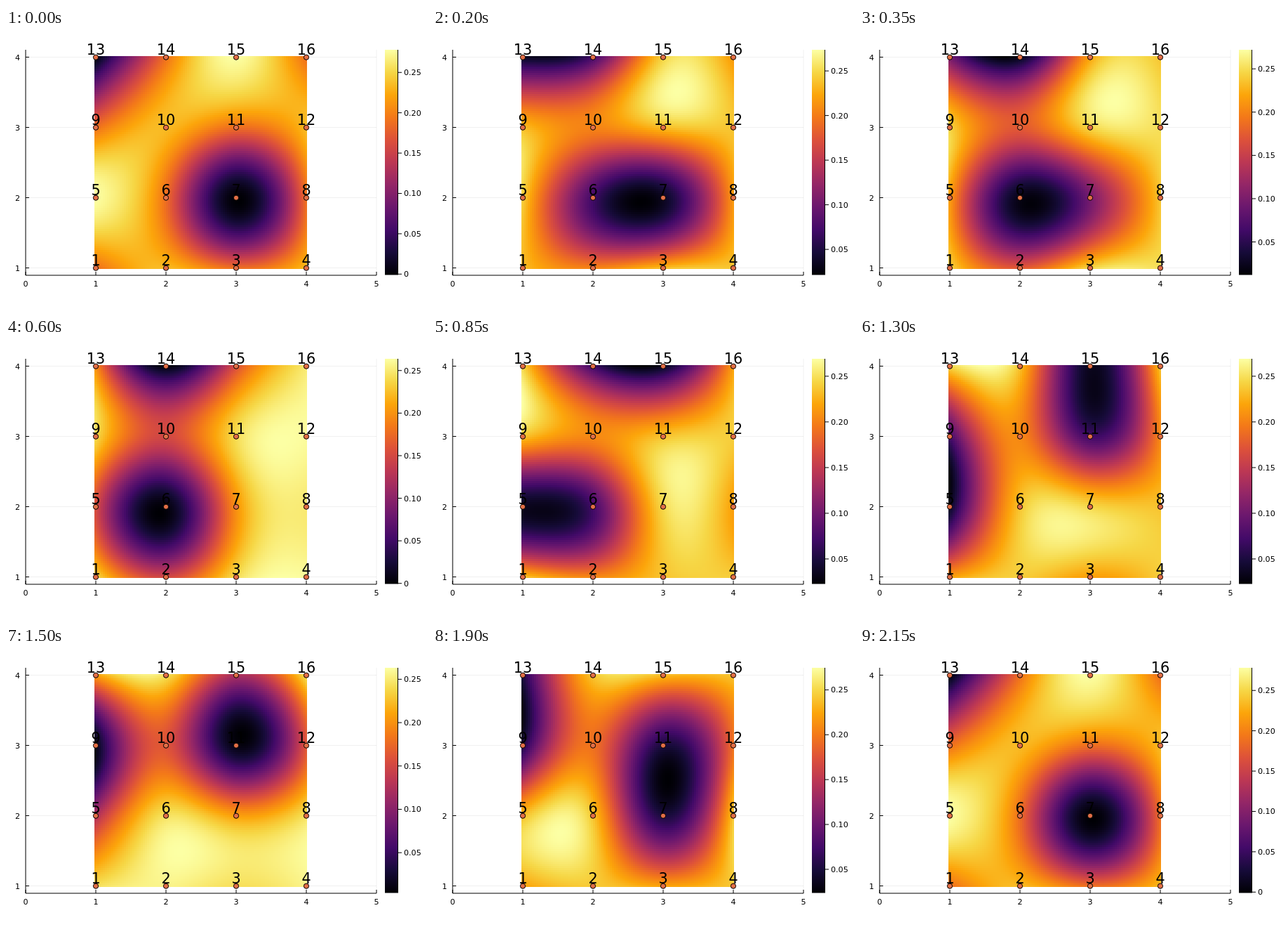
An HTML page with a canvas for the animation above (2.2 s loop, 600 by 400 pixels).

```html
<!DOCTYPE html>
<html lang="en">
<head>
<meta charset="utf-8">
<title>Two moving density holes on a 4 by 4 lattice</title>
<style>
html, body { margin: 0; width: 100%; height: 100%; overflow: hidden; background: #fff; }
canvas { display: block; }
</style>
</head>
<body>
<canvas id="stage" width="600" height="400"></canvas>
<script>
const ctx = document.getElementById('stage').getContext('2d');
const FONT = '"DejaVu Sans", Verdana, sans-serif';
const CELLS = 101, STEP_MS = 50, STEPS = 11;
const BAR = { x: 540, y: 31, w: 18, h: 320.5 };

// One hole visits these sites; the other is its point reflection.
const PATH = [[3, 2], [2, 2], [1, 2], [1, 3], [1, 4]];

// Site density by four times the squared periodic distances to both holes.
const DENSITY = {
  '4,4': .135, '4,20': .188, '8,8': .234, '16,16': .278, '16,32': .256, '20,20': .268,
  '1,17': .01, '1,25': .01, '5,5': .205, '5,13': .27, '13,13': .235, '9,25': .225, '9,17': .24
};

const INFERNO = ['000004', '160b39', '420a68', '6a176e', '932667', 'bc3754',
  'dd513a', 'f37819', 'fca50a', 'f6d746', 'fcffa4'];
const STOPS = INFERNO.map(c => [0, 2, 4].map(i => parseInt(c.substr(i, 2), 16)));

const heat = document.createElement('canvas');
heat.width = heat.height = CELLS;
const heatCtx = heat.getContext('2d');
const pixels = heatCtx.createImageData(CELLS, CELLS);

const px = x => 28 + 100 * x;
const py = y => 442 - 100 * y;
const mix = (a, b, t) => a + (b - a) * t;

function gap(a, b) {
  const d = Math.abs(a - b) % 4;
  return Math.min(d, 4 - d);
}

// Densities of the 16 sites, row by row, for one position of the holes.
function sites([hx, hy]) {
  const holes = [[hx, hy], [4 - hx, 6 - hy]];
  return Array.from({ length: 16 }, (_, i) => {
    const x = i % 4 + 1, y = Math.floor(i / 4) + 1;
    const key = holes.map(h => 4 * (gap(x, h[0]) ** 2 + gap(y, h[1]) ** 2))
      .sort((a, b) => a - b).join();
    return DENSITY[key] || 0;
  });
}

const LEGS = PATH.slice(1).map((to, i) => {
  const from = PATH[i];
  return [from, from.map((v, k) => (v + to[k]) / 2), to].map(sites);
});

// Natural cubic spline through four evenly spaced values.
function spline(p, x) {
  const i = Math.min(2, Math.floor(x)), u = x - i;
  const k1 = 6 * (p[0] - 2 * p[1] + p[2]), k2 = 6 * (p[1] - 2 * p[2] + p[3]);
  const m = [0, (4 * k1 - k2) / 15, (4 * k2 - k1) / 15, 0];
  return mix(p[i], p[i + 1], u) - u * (1 - u) / 6 * ((2 - u) * m[i] + (1 + u) * m[i + 1]);
}

function field(step) {
  const [a, mid, b] = LEGS[Math.floor(step / STEPS)];
  const s = step % STEPS / (STEPS - 1), r = 1 - s;
  const v = a.map((n, i) => r * r * n + 2 * r * s * mid[i] + s * s * b[i]);
  const rows = [0, 4, 8, 12].map(i => v.slice(i, i + 4));
  const out = [];
  for (let j = 0; j < CELLS; j++) {
    const column = rows.map(row => spline(row, j * .03));
    for (let i = 0; i < CELLS; i++) out[(CELLS - 1 - i) * CELLS + j] = spline(column, i * .03);
  }
  return out;
}

function line(x1, y1, x2, y2, color = '#000') {
  ctx.strokeStyle = color;
  ctx.lineWidth = 1;
  ctx.beginPath();
  ctx.moveTo(x1, y1);
  ctx.lineTo(x2, y2);
  ctx.stroke();
}

function text(str, x, y, align, size = 11.1) {
  ctx.font = `${size}px ${FONT}`;
  ctx.textAlign = align;
  ctx.fillStyle = '#000';
  ctx.fillText(str, x, y);
}

function drawAxes() {
  const faint = 'rgba(0,0,0,.06)';
  for (let x = 0; x <= 5; x++) {
    line(px(x), 31, px(x), 352, faint);
    line(px(x), 352, px(x), 347);
    text(x, px(x), 368, 'center');
  }
  for (let y = 1; y <= 4; y++) {
    line(28, py(y) - .5, 528, py(y) - .5, faint);
    line(28, py(y) - .5, 33, py(y) - .5);
    text(y, 20, py(y) + 4, 'right');
  }
  line(28, 31, 28, 352);
  line(28, 352, 528, 352);
}

function drawHeat(values, lo, hi) {
  values.forEach((v, i) => {
    const t = (v - lo) / (hi - lo) * 10, k = Math.min(9, Math.floor(t));
    for (let c = 0; c < 3; c++) pixels.data[4 * i + c] = mix(STOPS[k][c], STOPS[k + 1][c], t - k);
    pixels.data[4 * i + 3] = 255;
  });
  heatCtx.putImageData(pixels, 0, 0);
  ctx.imageSmoothingEnabled = false;
  ctx.drawImage(heat, 126, 40, 303, 303);
}

function drawSites() {
  for (let i = 0; i < 16; i++) {
    const x = px(i % 4 + 1), y = py(Math.floor(i / 4) + 1);
    ctx.beginPath();
    ctx.arc(x, y - .3, 3.6, 0, 2 * Math.PI);
    ctx.fillStyle = '#e36f47';
    ctx.fill();
    ctx.strokeStyle = '#000';
    ctx.lineWidth = 1;
    ctx.stroke();
    text(i + 1, x, y - 4.5, 'center', 20.8);
  }
}

function drawBar(lo, hi) {
  const bottom = BAR.y + BAR.h, right = BAR.x + BAR.w;
  const ramp = ctx.createLinearGradient(0, bottom, 0, BAR.y);
  INFERNO.forEach((c, i) => ramp.addColorStop(i / 10, '#' + c));
  ctx.fillStyle = ramp;
  ctx.fillRect(BAR.x, BAR.y, BAR.w, BAR.h);
  line(right + .5, BAR.y, right + .5, bottom);

  // A narrow range gets finer ticks.
  const fine = hi - lo < .24, step = fine ? .025 : .05;
  for (let n = Math.ceil(lo / step); n * step <= hi; n++) {
    const y = bottom - (n * step - lo) / (hi - lo) * BAR.h;
    line(right, y, right + 6, y);
    text(n ? (n * step).toFixed(fine ? 3 : 2) : '0', 567, y + 4, 'left');
  }
}

let shown = -1;
function frame() {
  const step = Math.floor(performance.now() / STEP_MS) % (STEPS * LEGS.length);
  if (step !== shown) {
    shown = step;
    const values = field(step);
    const lo = Math.min(...values), hi = Math.max(...values);
    ctx.fillStyle = '#fff';
    ctx.fillRect(0, 0, 600, 400);
    drawAxes();
    drawHeat(values, lo, hi);
    drawSites();
    drawBar(lo, hi);
  }
  requestAnimationFrame(frame);
}
frame();
</script>
</body>
</html>
```
